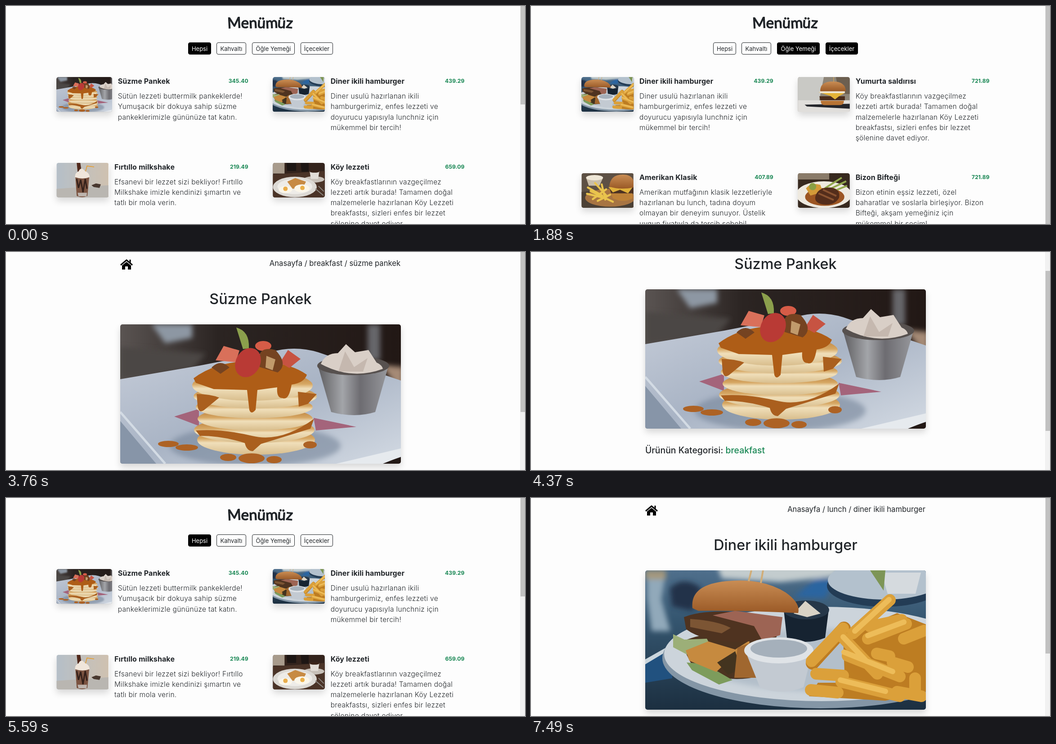
These frames come from a looping animation (1154 px wide and 485 px high, 8 s). An HTML page:

```html
<!DOCTYPE html>
<html lang="tr">
<head>
<meta charset="utf-8">
<title>Menümüz</title>
<style>
html, body { margin: 0; width: 100%; height: 100%; overflow: hidden; background: #fdfdfd; }
body { position: relative; font-family: Inter, sans-serif; color: #212529; }
div, .photo { position: absolute; white-space: pre; }
#pages { inset: 0; }
.page { left: 0; top: 0; width: 1154px; visibility: hidden; }
.brand { left: 365px; width: 400px; top: 16px; text-align: center; font: 33px/40px Lato, sans-serif; -webkit-text-stroke: 1.4px #212529; }
.brand span { display: inline-block; }
.button { top: 81px; height: 25px; border: 1px solid #212529; border-radius: 4px; text-align: center; font-size: 13px; line-height: 26px; }
.name { top: -3px; font-weight: 700; font-size: 16px; line-height: 24px; letter-spacing: .1px; }
.price { top: -3px; font-weight: 700; font-size: 12.2px; line-height: 24px; color: #198754; }
.text { font-weight: 300; font-size: 15.5px; line-height: 23.3px; letter-spacing: .33px; }
.photo { display: block; border-radius: 5px; box-shadow: 0 8px 15px rgba(0,0,0,.15); }
.trail { right: 277px; top: 13px; font-size: 16.6px; line-height: 24px; }
.dish { left: 254px; width: 624px; top: 85px; text-align: center; font-weight: 500; font-size: 32.3px; line-height: 40px; }
.fact { left: 254px; top: 505px; font-weight: 500; font-size: 19.4px; line-height: 28px; }
.fact b { font-weight: 500; color: #198754; }
#track { right: 0; top: 0; width: 11px; height: 100%; background: #f1f1f1; }
#thumb { right: 0; width: 10px; background: #c1c1c1; }
</style>
</head>
<body>
<svg width="0" height="0" style="position:absolute">
<defs>
  <filter id="soft"><feGaussianBlur stdDeviation="6"/></filter>
  <linearGradient id="plate" x2="1" y2="1"><stop stop-color="#c5ccd8"/><stop offset=".5" stop-color="#a9b4c5"/><stop offset="1" stop-color="#d3dae3"/></linearGradient>
  <linearGradient id="steel"><stop stop-color="#5d5c5f"/><stop offset=".35" stop-color="#a3a5a9"/><stop offset=".6" stop-color="#6d6c71"/><stop offset="1" stop-color="#98999d"/></linearGradient>
  <linearGradient id="dark"><stop stop-color="#5a5452"/><stop offset=".35" stop-color="#2b2422"/><stop offset="1" stop-color="#221815"/></linearGradient>
  <linearGradient id="blue" x2="0" y2="1"><stop stop-color="#4f6f8c"/><stop offset=".35" stop-color="#355670"/><stop offset="1" stop-color="#1c2f40"/></linearGradient>
  <linearGradient id="bun" x2="0" y2="1"><stop stop-color="#c98d54"/><stop offset="1" stop-color="#9a5926"/></linearGradient>
  <linearGradient id="wall"><stop stop-color="#b5bfc8"/><stop offset="1" stop-color="#cfc1b0"/></linearGradient>
  <linearGradient id="cake" x2="0" y2="1"><stop stop-color="#b06f2d"/><stop offset=".45" stop-color="#d6a763"/><stop offset=".6" stop-color="#f0dfba"/><stop offset="1" stop-color="#d8bd8c"/></linearGradient>

  <symbol id="pancake" viewBox="0 0 624 310" preserveAspectRatio="xMidYMid slice">
    <rect width="624" height="310" fill="url(#dark)"/>
    <g filter="url(#soft)">
      <path d="M70 0h90v30l-60 12z" fill="#8d97a3"/>
      <path d="M0 50 190 65 160 100 0 122z" fill="#4b4644"/>
      <path d="M550 0h28v80h-28z" fill="#66666a"/>
      <path d="M580 90 630 95V160z" fill="#a58a76"/>
    </g>
    <path d="M0 122 175 92 360 56Q400 50 440 62L624 125V295L580 310H0z" fill="url(#plate)"/>
    <ellipse cx="300" cy="270" rx="190" ry="45" fill="#76859a" opacity=".6" filter="url(#soft)"/>
    <path d="M0 215 80 310H0z" fill="#8795a8"/>
    <path d="M0 195 100 310" stroke="#d3dbe4" stroke-width="5"/>
    <path d="m480 310 144-34v18l-40 16z" fill="#e6eaee"/>
    <path d="M120 205 175 188v38zM430 208l95 20-90 8z" fill="#a4647b"/>
    <path d="M439 90h158l-30 105q-45 14-98 0z" fill="url(#steel)"/>
    <ellipse cx="518" cy="92" rx="80" ry="21" fill="#57514f"/>
    <path d="M446 88q10-24 38-24l18-20 20 18 30-5 18 28q12 5 14 14-70 26-138-11z" fill="#d9cfc7"/>
    <path d="m500 60 20 35 30-20-10 30h-55z" fill="#b9aaa1" opacity=".6"/>
    <g fill="url(#cake)">
      <ellipse cx="302" cy="257" rx="131" ry="33"/>
      <ellipse cx="298" cy="235" rx="134" ry="29"/>
      <ellipse cx="300" cy="210" rx="128" ry="26"/>
      <ellipse cx="298" cy="184" rx="130" ry="25"/>
      <ellipse cx="300" cy="160" rx="137" ry="27"/>
      <ellipse cx="294" cy="136" rx="134" ry="34"/>
    </g>
    <path d="M163 120q50-38 130-38t122 30q-6 18-34 22-6 36-20 30-14 0-12-24l-44 6-4 44q-10 12-14 0l-5-44-74-2-40-14z" fill="#ae5d17"/>
    <path d="M170 155q30 0 50 8l-34 28q-12 8-14-10zM395 150l42 5-20 22-20 6zM168 236q60-4 125 12t138-38l-8 22-110 34-18 16q-14 0-18-18-50-16-100-16z" fill="#aa5f1e"/>
    <path d="m212 80 18-32 35 10-8 26z" fill="#d9705a"/>
    <path d="m355 85 18-28 28 20-25 20z" fill="#c75342"/>
    <ellipse cx="318" cy="48" rx="18" ry="11" fill="#d65c47"/>
    <path d="M203 96q20-20 40 0l-20 14zM310 95q-10-50 35-38 30 32 5 50z" fill="#754321"/>
    <path d="M325 70l20 8-6 24-16-6z" fill="#c19a6c"/>
    <ellipse cx="284" cy="85" rx="27" ry="34" transform="rotate(28 284 85)" fill="#b93a35"/>
    <path d="M258 7q30 8 28 46l-13 2z" fill="#8b9f4c"/>
    <g fill="#ad6224">
      <ellipse cx="107" cy="266" rx="23" ry="7"/><ellipse cx="148" cy="274" rx="25" ry="7"/><ellipse cx="240" cy="296" rx="18" ry="8"/>
      <ellipse cx="292" cy="298" rx="29" ry="11"/><ellipse cx="342" cy="301" rx="17" ry="8"/><ellipse cx="422" cy="268" rx="15" ry="8"/>
    </g>
  </symbol>

  <symbol id="burger" viewBox="0 0 624 310" preserveAspectRatio="xMidYMid slice">
    <rect width="624" height="310" fill="url(#blue)"/>
    <g filter="url(#soft)">
      <path d="M160-10H440L420 14 300 26 170 18z" fill="#c3ccce"/>
      <path d="M330 60 380 18 420 20 400 62z" fill="#2a65a0"/>
      <path d="M55 40q30-30 70 0l-20 50-45-10z" fill="#22304a"/>
      <path d="M4 15h40l-8 50 20 70H14L4 60z" fill="#91a9ba"/>
      <path d="M0 0h46v20H0z" fill="#a4987c"/>
    </g>
    <path d="m0 200 60-35v75l-60 10z" fill="#21517f"/>
    <path d="m0 198 60-34v9L0 209z" fill="#cad5dc"/>
    <ellipse cx="532" cy="34" rx="128" ry="47" fill="#233c55"/>
    <ellipse cx="532" cy="22" rx="126" ry="43" fill="#b3c1cd"/>
    <path d="M525 5h88l-12 47h-62z" fill="#d5dade"/><path d="m500 0 30 45 4-45z" fill="#7d9556"/>
    <ellipse cx="390" cy="195" rx="352" ry="112" fill="#8496a6"/>
    <ellipse cx="392" cy="186" rx="350" ry="105" fill="#ccd4db"/>
    <ellipse cx="400" cy="200" rx="280" ry="70" fill="#b3bfca" filter="url(#soft)"/>
    <path d="M308 88h100l-8 62q-45 18-85 0z" fill="#162331"/>
    <ellipse cx="358" cy="88" rx="51" ry="21" fill="#263748"/><path d="m330 96 26-28 34 28-30 8z" fill="#d9d3c6"/>
    <path d="M78 160q90-40 180 0l-2 75q-80 20-150-20z" fill="#4c3420"/>
    <path d="m62 142 25 12 50-2 18 34-55 5-38-20z" fill="#9caf78"/>
    <path d="m92 205 40 3 62 36-30 10-60-32z" fill="#7d9c5c"/>
    <path d="m90 178 50-20 60 18 32-20-4 48-45-2-25 24-60-25z" fill="#c68a3f"/>
    <path d="m160 205 40-25 14 40-30 12z" fill="#43341f"/>
    <path d="m205 172 40-15 5 82h-52z" fill="#a0672f"/>
    <path d="M86 104q50-20 150-8l65 15-10 40-70 8q-90 2-130-28z" fill="#4f3320"/>
    <path d="M100 108q60 4 90 20l-20 12-70-14z" fill="#7c5534"/>
    <path d="m150 100 50-10 105 14-5 40-40 12-18-32z" fill="#9d6454"/>
    <path d="M105 84q-6-52 75-60 80-8 132 25 34 24 28 46-120-6-222-5z" fill="url(#bun)"/>
    <path d="m230 24 6-24m21 28 5-28" stroke="#d1ad78" stroke-width="4"/>
    <path d="M222 178h150l-20 82q-50 20-97 0z" fill="#c3cad2"/>
    <ellipse cx="297" cy="178" rx="77" ry="29" fill="#dfe3e7"/><ellipse cx="297" cy="174" rx="63" ry="20" fill="#a5b0bb"/>
    <path d="m440 150 60-30 60-25 64 25v150l-90 20-170-10 20-30 60 0z" fill="#bd7d22"/>
    <g stroke-linecap="round" stroke-width="30" stroke="#bd7c22">
      <path d="m372 206 70-77M590 258l-30-60M470 215l80 45"/>
    </g>
    <g stroke-linecap="round" stroke-width="26" stroke="#dba03a">
      <path d="m370 202 70-73M462 140l82-74M440 150l76 80M495 152l85-33M575 152l45-18M450 190l116 46M380 230l60 4M368 266l60 6M436 248l130 32M515 185l28 6M550 205l34 10M600 240v26M500 125l70-15M560 270l54 10"/>
    </g>
    <g stroke-linecap="round" stroke-width="12" stroke="#edbc59">
      <path d="m466 135 76-70M442 182l108 43M495 145l80-30M434 244l100 25M440 148l50 52"/>
    </g>
  </symbol>

  <symbol id="shake" viewBox="0 0 116 78">
    <rect width="116" height="78" fill="url(#wall)"/>
    <path d="M0 58 116 50V78H0z" fill="#b9b6b1"/>
    <path d="M45 0h8l3 20h-9z" fill="#50281a"/>
    <path d="m64 22 4-15 16 2" fill="none" stroke="#e69b28" stroke-width="1.6"/>
    <path d="m42 32 3 42q12 6 24 0l4-42z" fill="#7b5340"/>
    <path d="m45 36 4 20 5-18 5 28 5-30 4 22" fill="none" stroke="#33201a" stroke-width="3"/>
    <path d="M47 67h21l-1 8H49z" fill="#bdb4ad"/>
    <path d="M41 32q0-10 8-13 6-12 14-1 11 4 11 14-16 6-33 0z" fill="#f0e6db"/>
    <path d="m78 50 10-4 11 2-3 8-13-2z" fill="#49382f"/>
  </symbol>

  <symbol id="village" viewBox="0 0 116 78">
    <rect width="116" height="78" fill="#33231c"/>
    <path d="M0 26 116 18V78H0z" fill="#4a3327"/>
    <path d="M0 0h26v24H0z" fill="#a89b8c"/><path d="M30 0h22v18H32zM62 0h18v20H64z" fill="#1d1614"/>
    <ellipse cx="92" cy="37" rx="23" ry="7" fill="#c7c0b8"/><path d="M82 18h22l-3 18H85z" fill="#e2ddd7"/><ellipse cx="93" cy="19" rx="11" ry="3" fill="#3a241a"/>
    <ellipse cx="49" cy="54" rx="49" ry="23" fill="#dcd9d4"/><ellipse cx="49" cy="53" rx="39" ry="17" fill="#eeece8"/>
    <path d="m32 42 18-8 24 8-6 12-24 4z" fill="#c78a43"/>
    <ellipse cx="28" cy="60" rx="15" ry="8" fill="#fbf6e9"/><ellipse cx="65" cy="57" rx="17" ry="9" fill="#fbf6e9"/>
    <circle cx="28" cy="58" r="5" fill="#e9ad4c"/><circle cx="66" cy="56" r="5" fill="#eab04a"/>
    <path d="m95 58 18 15M102 52l12 12" stroke="#8d8781" stroke-width="2"/>
  </symbol>

  <symbol id="egg" viewBox="0 0 116 78">
    <rect width="116" height="78" fill="#8d8578"/><path d="M0 0h58L46 60H0z" fill="#c9c9c5"/>
    <path d="M0 52h116v26H0z" fill="#e0dedb"/><path d="M85 0h31v38H92z" fill="#6c5f50"/>
    <path d="m15 62 101-2v11L20 66z" fill="#24252b"/>
    <path d="M51 53h52q0 10-10 10H60q-9 0-9-10z" fill="#b87435"/>
    <path d="M48 43h57v9H50z" fill="#4a2c1c"/><path d="m46 34 60 1-14 8-9 7-11-8z" fill="#e5b337"/>
    <path d="M49 31h56v5H49z" fill="#efe7d6"/>
    <path d="M50 32q-1-22 28-22t29 22z" fill="url(#bun)"/><path d="M80 0v11" stroke="#c9a15d" stroke-width="1.5"/>
  </symbol>

  <symbol id="classic" viewBox="0 0 116 78">
    <rect width="116" height="78" fill="#5d5044"/><path d="M0 42 116 30V78H0z" fill="#4b4035"/>
    <ellipse cx="64" cy="55" rx="56" ry="20" fill="#a77442"/>
    <path d="M10 10h38l-8 18H16z" fill="#c9bda9"/><ellipse cx="29" cy="10" rx="19" ry="6" fill="#eee6d6"/>
    <path d="m14 32 32 18M30 22l27 30M12 46l42 10M25 58l30-22M45 25l8 34M20 40l50 24M36 62l28-14" stroke="#e9c34d" stroke-width="4.5" stroke-linecap="round"/>
    <path d="M64 42h50v14q-20 12-44 0z" fill="#bd8138"/><path d="M62 32h54v13H66z" fill="#4c3222"/><path d="m60 31 56-2-12 16-18-8-16 6z" fill="#e0b13b"/>
    <path d="M62 30Q64 3 92 3q20 0 24 14v15q-30 6-54-2z" fill="url(#bun)"/>
  </symbol>

  <symbol id="steak" viewBox="0 0 116 78">
    <rect width="116" height="78" fill="#37291f"/><path d="M0 0h70v14H0z" fill="#8a7b69"/>
    <ellipse cx="58" cy="48" rx="62" ry="30" fill="#eee9df"/><ellipse cx="60" cy="53" rx="44" ry="20" fill="#9c5522"/>
    <path d="M18 34q10-14 32-8l6 16-28 8z" fill="#d39a38"/><circle cx="33" cy="30" r="8" fill="#8aa044"/>
    <path d="m60 34 38-24M66 38l42-20M75 42l35-14" stroke="#92a84c" stroke-width="4"/>
    <path d="M39 52q6-21 34-20 23 3 19 23-10 18-36 15-20-4-17-18z" fill="#542d1b"/><path d="m46 45 34 15M56 37l30 14" stroke="#8a5331" stroke-width="4"/>
  </symbol>
</defs>
</svg>
<div id="pages"></div>
<div id="track"></div><div id="thumb"></div>
<script>
const $ = id => document.getElementById(id);
const clamp = x => Math.max(0, Math.min(1, x));
const village = 'Köy breakfastlarının vazgeçilmez\nlezzeti artık burada! Tamamen doğal\nmalzemelerle hazırlanan Köy Lezzeti\nbreakfastsı, sizleri enfes bir lezzet\nşölenine davet ediyor.';

// photo, name, price, description
const menu = [
  ['pancake', 'Süzme Pankek', '345.40', 'Sütün lezzeti buttermilk pankeklerde!\nYumuşacık bir dokuya sahip süzme\npankeklerimizle gününüze tat katın.'],
  ['burger', 'Diner ikili hamburger', '439.29', 'Diner usulü hazırlanan ikili\nhamburgerimiz, enfes lezzeti ve\ndoyurucu yapısıyla lunchniz için\nmükemmel bir tercih!'],
  ['shake', 'Fırtıllo milkshake', '219.49', 'Efsanevi bir lezzet sizi bekliyor! Fırtıllo\nMilkshake imizle kendinizi şımartın ve\ntatlı bir mola verin.'],
  ['village', 'Köy lezzeti', '659.09', village],
  ['egg', 'Yumurta saldırısı', '721.89', village],
  ['shake', 'Bisküvi rüyası', '269.49', 'Bisküvi tadını sevenler için hazırlanan\nbu içecek, kremalı dokusuyla sizi\ntatlı bir rüyaya davet ediyor.'],
  ['village', 'Bol pastırma', '329.89', 'Güne güçlü başlamak isteyenler için\nbol pastırmalı breakfast, enfes\nlezzetiyle sizi bekliyor.'],
  ['classic', 'Amerikan Klasik', '407.89', 'Amerikan mutfağının klasik lezzetleriyle\nhazırlanan bu lunch, tadına doyum\nolmayan bir deneyim sunuyor. Üstelik\nuygun fiyatıyla da tercih sebebi!'],
  ['shake', 'Akşam keyfi', '249.89', 'Günün yorgunluğunu atmak için\nserinletici ve hafif bir lezzet\narayanlara özel.'],
  ['steak', 'Bizon Bifteği', '721.89', 'Bizon etinin eşsiz lezzeti, özel\nbaharatlar ve soslarla birleşiyor. Bizon\nBifteği, akşam yemeğiniz için\nmükemmel bir seçim!'],
];
const lists = { all: [...menu.keys()], breakfast: [0, 3, 6], lunch: [1, 4, 7, 9], drinks: [2, 5, 8] };
const thumbHeights = { all: 219, breakfast: 485, lunch: 485, drinks: 0, pancake: 356, burger: 346 };

// label, left, width, [from, to] spans in which the button is filled
const buttons = [
  ['Hepsi', 405, 49, [[-999, 560], [2420, 9999]]],
  ['Kahvaltı', 468, 64, [[280, 1460], [2370, 2410], [6910, 6965]]],
  ['Öğle Yemeği', 547, 93, [[1080, 1960], [2310, 2360], [6262, 6281]]],
  ['İçecekler', 655, 70, [[1700, 2470]]],
];
// start, page, whether the list fades in
const scenes = [[0, 'all'], [560, 'breakfast', 1], [1460, 'lunch', 1], [1960, 'drinks', 1],
  [2470, 'all', 1], [3760, 'pancake'], [5590, 'all'], [7450, 'burger']];
const scrolls = [[0, 0], [4370, 78], [4400, 97], [4600, 30], [4630, 0],
  [5670, 45], [5715, 85], [5760, 97], [5920, 35], [5970, 0]];
const FADE = 400, HOVER = 120, LINE = 23.3;

const photo = (id, x, y, w, h) =>
  `<svg class="photo" style="left:${x}px;top:${y}px" width="${w}" height="${h}"><use href="#${id}" width="${w}" height="${h}"/></svg>`;

function item([id, name, price, text], column, y) {
  const width = id === 'pancake' ? 124 : 116.3, x = width + 12.4;
  return `<div style="left:${column ? 593 : 112.3}px;top:${y}px;width:426.4px">${photo(id, 0, 0, width, 77.5)}
    <div class="name" style="left:${x}px">${name}</div><div class="price" style="right:0">${price}</div>
    <div class="text" style="left:${x}px;top:31px">${text}</div></div>`;
}

function listPage(indexes) {
  let html = '', y = 158;
  for (let i = 0; i < indexes.length; i += 2) {
    const row = indexes.slice(i, i + 2).map(n => menu[n]);
    html += row.map((dish, column) => item(dish, column, y)).join('');
    y += Math.max(...row.map(dish => dish[3].split('\n').length)) * LINE + 97.3;
  }
  return html;
}

function detailPage([id, name, , text], category) {
  return `<svg style="position:absolute;left:254px;top:15px" width="28" height="25">
      <path d="M1 14 14 3l13 11M22 2v8" fill="none" stroke="#000" stroke-width="3"/><path d="M14 7 24 15v9h-7v-7h-6v7H4v-9z"/></svg>
    <div class="trail">Anasayfa / ${category} / ${name.toLowerCase()}</div>
    <div class="dish">${name}</div>${photo(id, 254, 161, 624, 310)}
    <div class="fact">Ürünün Kategorisi: <b>${category}</b></div>
    <div class="text" style="left:254px;top:584px">${text}</div>`;
}

const tilts = [-3, 4, -3, 3, -3, 4, 5];
const header = '<div class="brand">' +
  [...'Menümüz'].map((c, i) => `<span style="transform:rotate(${tilts[i]}deg)">${c}</span>`).join('') + '</div>' +
  buttons.map(([label, x, w]) => `<div class="button" style="left:${x}px;width:${w}px">${label}</div>`).join('');
const page = (id, html) => `<div class="page" id="page-${id}">${html}</div>`;
$('pages').innerHTML = page('header', header) +
  Object.entries(lists).map(([id, indexes]) => page(id, listPage(indexes))).join('') +
  page('detail-pancake', detailPage(menu[0], 'breakfast')) + page('detail-burger', detailPage(menu[1], 'lunch'));

const pages = [...document.querySelectorAll('.page')];
const buttonNodes = [...document.querySelectorAll('.button')];
const latest = (steps, t) => steps.filter(step => step[0] <= t).pop();
const filled = (spans, t) => Math.max(...spans.map(([from, to]) =>
  clamp(clamp((Math.min(t, to) - from) / HOVER) - Math.max(0, t - to) / HOVER)));
const mix = (a, b, k) => `rgb(${a.map((v, i) => Math.round(v + (b[i] - v) * k))})`;

function draw(t) {
  const [start, view, fades] = latest(scenes, t), scroll = latest(scrolls, t)[1];
  const isList = view in lists, barHeight = thumbHeights[view];
  const shown = isList ? ['page-header', 'page-' + view] : ['page-detail-' + view];
  for (const p of pages) p.style.visibility = shown.includes(p.id) ? 'visible' : 'hidden';
  if (isList) $('page-' + view).style.opacity = fades ? 1 - (1 - clamp((t - start) / FADE)) ** 2 : 1;
  // A short page has no scrollbar, so its centred content moves right.
  $('pages').style.transform = `translate(${barHeight ? 0 : 5}px, ${-scroll}px)`;
  $('track').style.display = barHeight ? '' : 'none';
  $('thumb').style.cssText = `top:${scroll * .54}px;height:${barHeight}px`;
  buttons.forEach(([, , , spans], i) => {
    const k = filled(spans, t), style = buttonNodes[i].style;
    style.background = mix([253, 253, 253], [0, 0, 0], k);
    style.color = mix([33, 37, 41], [255, 255, 255], k);
    style.borderColor = mix([33, 37, 41], [0, 0, 0], k);
  });
}

function tick() {
  draw(performance.now() % 8000);
  requestAnimationFrame(tick);
}
tick();
</script>
</body>
</html>
```
